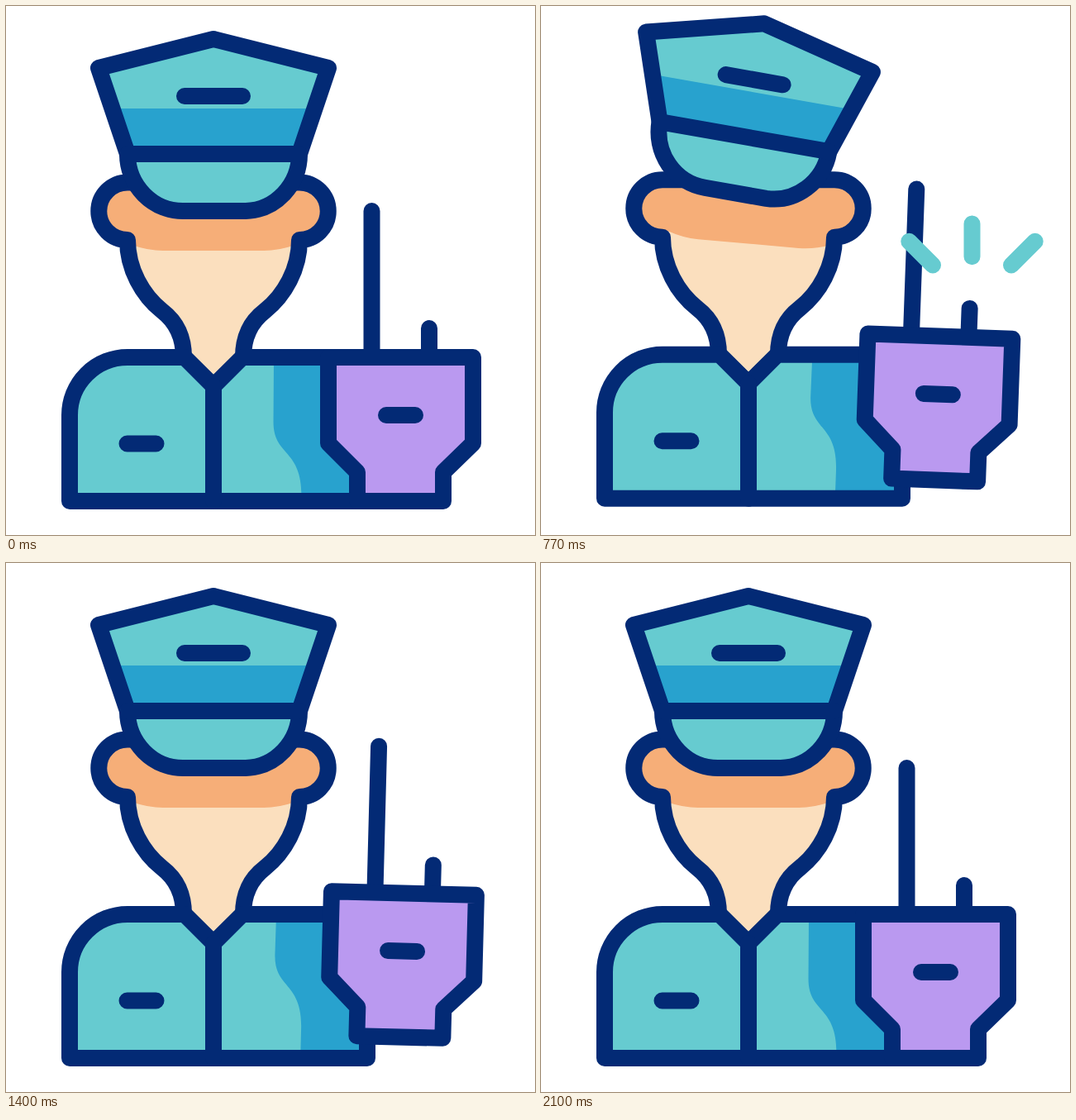
An HTML page for the animation above (2670 ms loop, 640 by 640 pixels).

```html
<!DOCTYPE html>
<html lang="en">
<head>
<meta charset="utf-8">
<style>
  html, body { margin: 0; height: 100%; overflow: hidden; background: #fff; }
  svg { display: block; width: 100vw; height: 100vh; }
  .line { fill: none; stroke: #032a75; stroke-width: 20; stroke-linecap: round; stroke-linejoin: round; }
  .teal { fill: #66cbd0; }
  .blue { fill: #28a2ce; }
  #rays { fill: none; stroke: #66cbd0; stroke-width: 20; stroke-linecap: round; }
</style>
</head>
<body>
<svg viewBox="0 0 640 640">
  <defs>
    <path id="headShape" d="M147 213.5A34.75 34.75 0 0 0 147 283C147 318 165 350 189 369C206 382 215 400 215 425L251 460L287 425C287 400 296 382 313 369C337 350 355 318 355 283A34.75 34.75 0 0 0 355 213.5Z"/>
    <path id="coat" d="M77 599V495A70 70 0 0 1 147 425H216L251 460L286 425H437V599Z"/>
    <path id="cap" d="M147 179L112 75L251 40L390 75L355 179A67 69 0 0 1 290 248H215A67 69 0 0 1 147 179"/>
    <clipPath id="inHead"><use href="#headShape"/></clipPath>
    <clipPath id="inCoat"><use href="#coat"/></clipPath>
  </defs>

  <g id="body">
    <use href="#headShape" fill="#fbdfbe"/>
    <g clip-path="url(#inHead)">
      <path id="faceShade" fill="#f6ae78" d="M60 150H442V310H350V289Q330 296 312 296H190Q172 296 152 289V310H60Z"/>
    </g>
    <use href="#headShape" class="line"/>
    <use href="#coat" class="teal"/>
    <g clip-path="url(#inCoat)">
      <path id="coatShade" class="blue" d="M324.5 350L323.5 503C323.5 545 357.5 535 357.5 592V660H520V350Z"/>
    </g>
    <use href="#coat" class="line"/>
    <path class="line" d="M251 460V599M146.5 529.5H181.5"/>
  </g>

  <g id="hat">
    <use href="#cap" class="teal"/>
    <path class="blue" d="M128.5 124H373.5L355 179H147Z"/>
    <use href="#cap" class="line"/>
    <path class="line" d="M147 179H355M216 109H286"/>
  </g>

  <g id="radio">
    <path class="line" d="M442.5 248V425M512 390V425"/>
    <path class="line" style="fill:#ba99f0" d="M390 425H565V529L529 564V599H425V564L390 529Z"/>
    <path class="line" d="M460 495H495"/>
  </g>

  <path id="rays"/>
</svg>
<script>
const LOOP = 2670, STEP = 100 / 3, LAST = 63;
const el = id => document.getElementById(id);
const clamp = (v, lo, hi) => Math.min(hi, Math.max(lo, v));
const move = (id, y, angle, cx, cy) =>
  el(id).setAttribute('transform', `translate(0 ${y}) rotate(${angle} ${cx} ${cy})`);

// Eased 0 to 1 between steps a and b.
function ramp(f, a, b) {
  const u = clamp((f - a) / (b - a), 0, 1);
  return u * u * (3 - 2 * u);
}

// Everything dips together, then springs up; the hat leaves the head last.
const bodyY = f => 12 * ramp(f, 0, 4) - 32 * ramp(f, 4, 15)
  + 21.5 * ramp(f, 15, 26.5) - 1.5 * ramp(f, 26.5, 33);
const hatY = f => 12 * ramp(f, 0, 4) - 18 * ramp(f, 4, 12)
  - 14.5 * ramp(f, 16, 22.5) + 20.5 * ramp(f, 22.5, 36);
const hatTurn = f => 10 * (ramp(f, 16, 23) - ramp(f, 23, 40));
const radioY = f => 12.5 * ramp(f, 0, 4.5) - 38 * ramp(f, 4.5, 16) + 25.5 * ramp(f, 54, 63);

// The radio's swing slows down slightly as it goes.
function radioTurn(f) {
  const swings = 0.277 * clamp(f - 16, 0, 38) ** 0.924;
  return 4 * Math.cos(Math.PI * swings) * (ramp(f, 8, 16) - ramp(f, 54, 63));
}

// Three bursts of rays; the head of each ray leads, the tail catches up.
function rayPath(f) {
  const p = (f - 17) % 14;
  if (f < 17 || f >= 59 || p <= 0 || p >= 8.5) return '';
  const head = 1 - (1 - Math.min(p / 8, 1)) ** 2.5, tail = (p / 8.5) ** 2.2;
  return [-1, 0, 1].map(side => {
    const point = k => `${521.5 + side * (21 + 57 * k)} ${340 - (side ? 57 : 79) * k}`;
    return `M${point(tail)}L${point(head)}`;
  }).join('');
}

function draw(now) {
  const f = Math.min(LAST, Math.floor((now % LOOP + 7) / STEP));
  const by = bodyY(f), hy = hatY(f), turn = hatTurn(f), ry = radioY(f), tilt = radioTurn(f);
  move('body', by, 0, 0, 0);
  move('faceShade', (hy - by) * 0.3, turn / 2, 251, 296);
  move('coatShade', ry - by, tilt, 477, 575);
  move('hat', hy, turn, 251, 150);
  move('radio', ry, tilt, 477, 575);
  el('rays').setAttribute('d', rayPath(f));
}

const start = performance.now();
function tick() {
  draw(performance.now() - start);
  requestAnimationFrame(tick);
}
tick();
</script>
</body>
</html>
```
